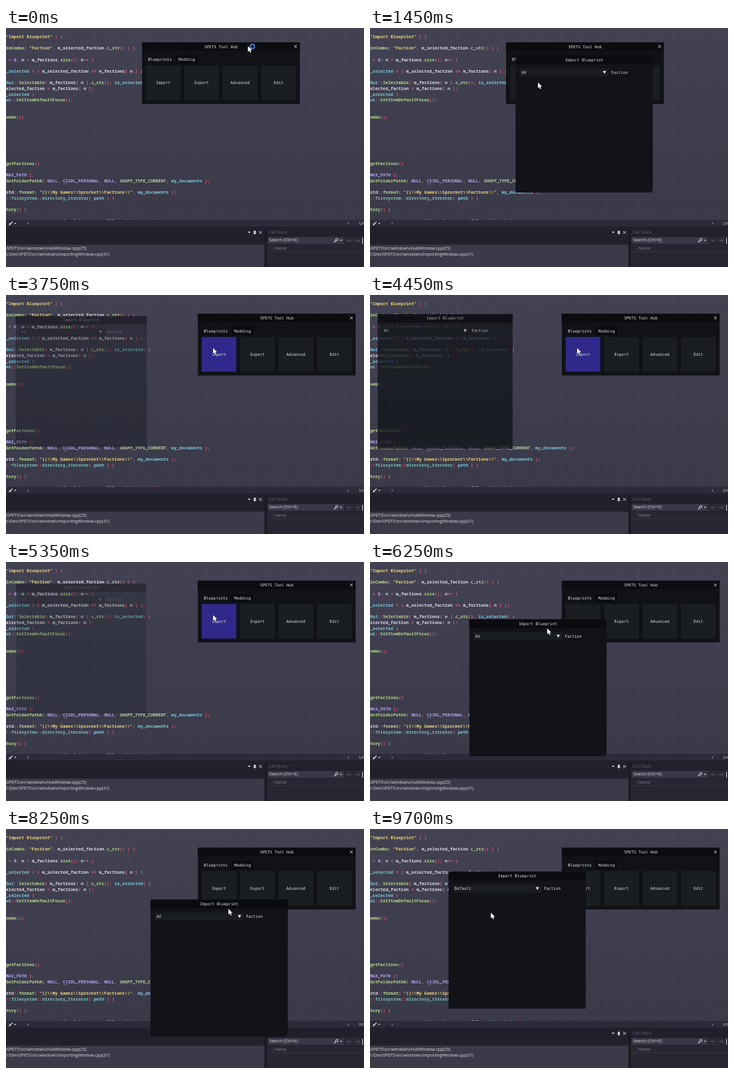
Recreate the animation shown at these times as an HTML page with a canvas. Size 600 px wide and 401 px high, loop 9.9 s.

```html
<!DOCTYPE html>
<html lang="en">
<head>
<meta charset="utf-8">
<title>Tool hub</title>
<style>
html, body { margin: 0; width: 100%; height: 100%; overflow: hidden; background: #21212c; }
canvas { display: block; }
</style>
</head>
<body>
<canvas id="stage" width="600" height="401"></canvas>
<script>
const LOOP = 9900, STEP = 50, SIZE = 230, FADE = 200;
const CODE = '600 7.21px "Noto Sans Mono", monospace';
const MONO = '6.65px "DejaVu Sans Mono", monospace';
const SANS = '7.1px "Open Sans", sans-serif';
const ADVANCE = 4.33, ROW = 9.67;
const LIGHT = '#e4e4e6', BAR = '#0b0c10', PURPLE = '#30298b';
const stage = document.getElementById('stage');
const backdrop = document.createElement('canvas');
backdrop.width = 600;
backdrop.height = 401;
let c = backdrop.getContext('2d');

const source = String.raw`"Import Blueprint" ) )

inCombo( "Faction", m_selected_faction.c_str() ) )

 = 0; n < m_factions.size(); n++ )

_selected = ( m_selected_faction == m_factions[ n ] );

Gui::Selectable( m_factions[ n ].c_str(), is_selected) )
elected_faction = m_factions[ n ];
_selected )
ui::SetItemDefaultFocus();


ombo();







getFactions()

MAX_PATH ];
GetFolderPathA( NULL, CSIDL_PERSONAL, NULL, SHGFP_TYPE_CURRENT, my_documents );

std::format( "{}\\My Games\\Sprocket\\Factions\\", my_documents );
::filesystem::directory_iterator( path ) )

tory() )

                    std::string name = file.path().string();`;

// Cursor moves: start, end, target x, target y, window being dragged.
const moves = [
  [150, 600, 276, 92],
  [1100, 1400, 281, 91],
  [1550, 1800, 374, 61],
  [1900, 2500, 141, 45, 'dialog'],
  [2600, 2950, 390, 32],
  [3100, 3400, 483.5, 39.5, 'hub'],
  [3400, 3600, 346.5, 88.5],
  [5600, 5950, 141, 45],
  [6050, 6250, 296.5, 111, 'dialog'],
  [6250, 6550, 451.5, 167, 'dialog'],
  [6650, 7000, 368, 109],
  [7800, 8000, 451.5, 167],
  [8050, 8500, 261.5, 86.5, 'dialog'],
  [8500, 8700, 200, 101],
  [8850, 9050, 198, 128],
  [9100, 9250, 202, 140]
];
// The dialog opens and closes in turn.
const toggles = [1080, 3620, 4300, 5195, 5480, 7436, 7650];

function pose(t) {
  const p = { cursor: [405, 30], hub: [228, 24], dialog: [244, 46] };
  for (const [start, end, x, y, dragged] of moves) {
    if (t <= start) break;
    const u = Math.min(1, (t - start) / (end - start)), e = u * u * (3 - 2 * u);
    const dx = (x - p.cursor[0]) * e, dy = (y - p.cursor[1]) * e;
    for (const name of ['cursor', dragged]) {
      if (name) p[name] = [p[name][0] + dx, p[name][1] + dy];
    }
  }
  return p;
}

function opacity(t) {
  const past = toggles.filter(s => s <= t);
  if (!past.length) return 0;
  const u = Math.min(1, (t - past[past.length - 1]) / FADE);
  return past.length % 2 ? u : 1 - u;
}

function rect(x, y, w, h, color) {
  c.fillStyle = color;
  c.fillRect(x, y, w, h);
}

function text(s, x, y, color = LIGHT, font = MONO, align = 'left') {
  c.font = font;
  c.fillStyle = color;
  c.textAlign = align;
  c.textBaseline = 'middle';
  c.fillText(s, x, y);
}

function trace(points) {
  c.beginPath();
  points.forEach(p => c.lineTo(...p));
}

function poly(points, color) {
  trace(points);
  c.fillStyle = color;
  c.fill();
}

function line(points, color, width = 1) {
  trace(points);
  c.strokeStyle = color;
  c.lineWidth = width;
  c.stroke();
}

function ring(x, y, r, color, width) {
  c.beginPath();
  c.arc(x, y, r, 0, 7);
  c.strokeStyle = color;
  c.lineWidth = width;
  c.stroke();
}

function cross(x, y, r) {
  for (const d of [r, -r]) line([[x - r, y - d], [x + r, y + d]], LIGHT);
}

function down(x, y, w, h) {
  poly([[x - w, y - h], [x + w, y - h], [x, y + h]], LIGHT);
}

function sideways(x, y, dir) {
  poly([[x - dir, y - 2.5], [x - dir, y + 2.5], [x + dir * 1.5, y]], '#77778a');
}

function tokenColor(token, next) {
  if (token[0] === '"') return '#ecd277';
  if (/^\d/.test(token)) return '#b39df0';
  if (!/^\w/.test(token)) return '#ee5f7c';
  if (token.startsWith('SHGFP')) return '#b6d3a0';
  if (/^[A-Z_]+$/.test(token)) return '#b3a0ee';
  if (/^(_selected|is_selected|my_documents|path|Gui|ui)$/.test(token)) return '#7fcbe0';
  if (/^(filesystem|directory_iterator)$/.test(token)) return '#7bc2b8';
  return next === '(' ? '#b5d98a' : '#dddde4';
}

function drawCode(s, row) {
  for (const m of s.matchAll(/"[^"]*"|\w+|[^\s\w"]+/g)) {
    const color = tokenColor(m[0], s[m.index + m[0].length]);
    text(m[0], m.index * ADVANCE, 15 + row * ROW, color, CODE);
  }
}

function drawEditor() {
  const shade = c.createLinearGradient(0, 0, 0, 322);
  shade.addColorStop(0, '#424252');
  shade.addColorStop(.6, '#3d3d4d');
  shade.addColorStop(1, '#3a3a49');
  c.save();
  c.beginPath();
  c.rect(0, 0, 600, 322);
  c.clip();
  rect(0, 0, 600, 322, shade);
  source.split('\n').forEach(drawCode);
  c.restore();
  c.setLineDash([1, 1]);
  line([[97, 261.5], [103, 261.5]], '#a8a8b4');
  c.setLineDash([]);
}

function drawPanels() {
  rect(0, 322, 600, 11, '#2b2b39');
  line([[5, 331], [11, 325]], LIGHT, 1.5);
  line([[5, 327], [8, 330]], LIGHT);
  down(15.5, 328, 2, 1);
  sideways(37, 328, -1);
  sideways(574, 328, 1);
  text('Ln:', 592, 328, LIGHT, SANS);

  down(407.5, 343, 2.5, 1.3);
  rect(415.5, 340, 3, 4, LIGHT);
  line([[414.5, 344.5], [419.5, 344.5]], LIGHT);
  line([[417, 344], [417, 347]], LIGHT);
  cross(426.5, 343, 2.3);
  rect(0, 363.5, 433, 37.5, '#3a3a48');
  text('\\SPETS\\src\\window\\cHubWindow.cpp(25)', -1, 370, LIGHT, SANS);
  text('0:\\Dev\\SPETS\\src\\window\\cImportingWindow.cpp(31)', -2, 380, LIGHT, SANS);
  rect(433, 337, 4, 64, '#1b1b24');

  text('Call Stack', 440, 343.5, '#656574', SANS);
  rect(438, 350, 162, 13, '#292936');
  rect(439, 351, 127, 11, '#383848');
  text('Search (Ctrl+E)', 441, 356.5, LIGHT, SANS);
  ring(554.5, 355, 2, LIGHT, 1);
  line([[553, 356.5], [550, 359.5]], LIGHT, 1.3);
  down(561.5, 356.5, 2, 1);
  for (const [x, d] of [[572, 1], [592, -1]]) {
    line([[x, 356.5], [x + 7 * d, 356.5]], '#5a5a69');
    line([[x + 3 * d, 353.5], [x, 356.5], [x + 3 * d, 359.5]], '#5a5a69');
  }
  rect(597, 352, 1, 10, LIGHT);
  rect(438, 364, 162, 37, '#272733');
  rect(438, 375, 162, 1, '#363644');
  rect(446, 364, 1, 11, '#363644');
  text('Name', 450, 370, '#858593', SANS);
}

const buttonX = i => 6.5 + i * 64.4;
const inside = (x, y, w, h) => x >= 0 && y >= 0 && x <= w && y <= h;

function drawHub(x, y, hover) {
  c.save();
  c.translate(x, y);
  rect(0, 0, 264.5, 103.5, '#101217');
  rect(0, 0, 264.5, 14, BAR);
  text('SPETS Tool Hub', 132.5, 8, LIGHT, MONO, 'center');
  cross(257.3, 7, 2.2);
  rect(57, 22, 36.5, 14, '#0a0b0e');
  text('Blueprints', 10, 29.3);
  text('Modding', 61, 29.3);
  ['Import', 'Export', 'Advanced', 'Edit'].forEach((label, i) => {
    rect(buttonX(i), 39, 58, 58, i === 0 && hover ? PURPLE : '#1a1e21');
    text(label, buttonX(i) + 29, 68.3, LIGHT, MONO, 'center');
  });
  c.restore();
}

function drawDialog(x, y, alpha, faction, popup, cursorY) {
  const half = SIZE / 2, k = 1 - .067 * (1 - alpha);
  c.save();
  c.globalAlpha = alpha;
  c.translate(x + half, y + half);
  c.scale(k, k);
  c.translate(-half, -half);
  rect(0, 0, SIZE, SIZE, '#111318');
  rect(0, 0, SIZE, 15, BAR);
  text('Import Blueprint', half, 7.8, LIGHT, MONO, 'center');
  rect(7, 22, 149, 13.5, '#1a1d21');
  text(faction, 10, 28.8);
  down(149, 28.5, 2.8, 2.6);
  text('Faction', 160, 28.8);
  poly([[SIZE, SIZE - 6], [SIZE, SIZE], [SIZE - 6, SIZE]], '#1d2024');
  if (popup) {
    rect(7, 36, 149, 31, BAR);
    ['AV', 'Default'].forEach((name, i) => {
      const top = 39 + i * 13;
      if (inside(0, cursorY - top, 1, 12)) rect(9, top, 145, 12, PURPLE);
      text(name, 12, top + 6);
    });
  }
  c.restore();
}

function drawCursor(x, y, busy) {
  const arrow = [[0, 0], [0, 9.5], [2.2, 7.6], [3.8, 11], [5.4, 10.2], [3.9, 7], [6.8, 6.8], [0, 0]];
  c.save();
  c.translate(x + .5, y + .5);
  line(arrow, '#101014');
  poly(arrow, '#fff');
  if (busy) ring(7.5, .5, 3.6, '#3f86d8', 2.2);
  c.restore();
}

function draw(t) {
  const { cursor: [mx, my], hub: [hx, hy], dialog: [wx, wy] } = pose(t);
  const alpha = opacity(t);
  const covered = alpha > 0 && inside(mx - wx, my - wy, SIZE, SIZE);
  const hover = !covered && inside(mx - hx - buttonX(0), my - hy - 39, 58, 58);
  c.drawImage(backdrop, 0, 0);
  drawHub(hx, hy, hover);
  drawDialog(wx, wy, alpha, t < 9100 ? 'AV' : 'Default', t >= 8750 && t < 9100, my - wy);
  drawCursor(mx, my, t < 250);
}

rect(0, 0, 600, 401, '#21212c');
drawEditor();
drawPanels();
c = stage.getContext('2d');
const start = performance.now();
function frame() {
  const t = (performance.now() - start) % LOOP;
  draw(Math.floor(t / STEP) * STEP);
  requestAnimationFrame(frame);
}
frame();
</script>
</body>
</html>
```
